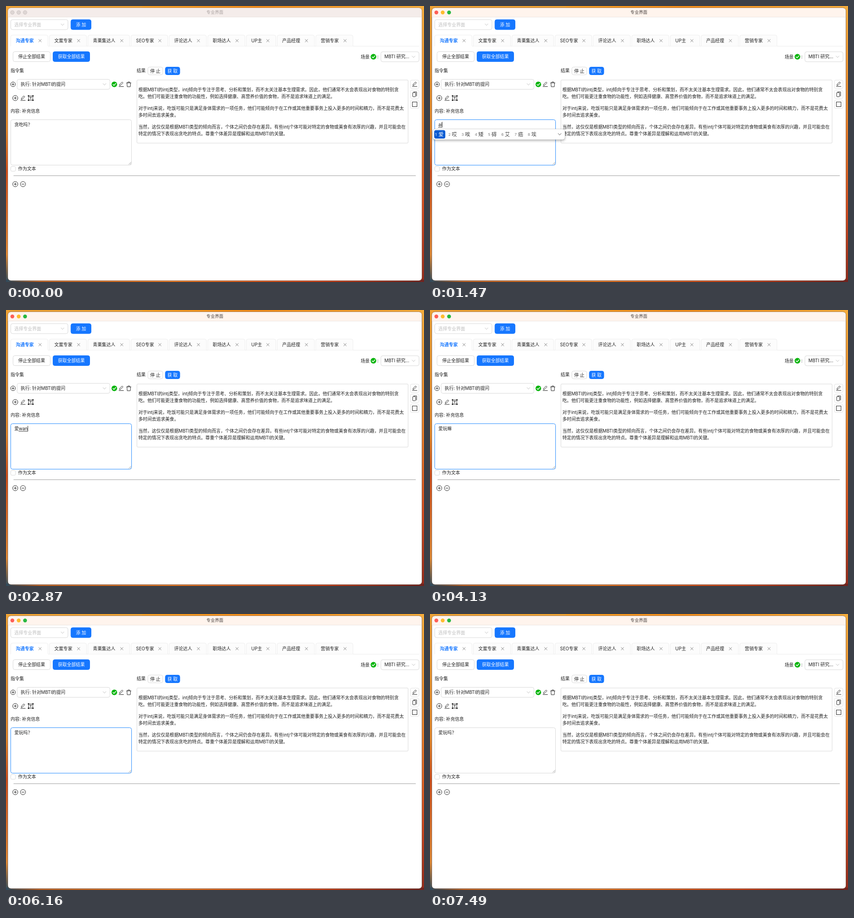
An HTML page for the animation above (8000 ms loop, 921x608 px).

```html
<!DOCTYPE html>
<html lang="zh-CN">
<head>
<meta charset="utf-8">
<title>专业界面</title>
<style>
html, body { margin: 0; width: 100%; height: 100%; overflow: hidden; }
body { background: #d9772a; }
svg { display: block; width: 921px; height: 608px; }
text { font: 9.85px Inter, 'Noto Sans CJK SC', sans-serif; fill: #1f1f1f; white-space: pre; }
.line { fill: none; stroke: #222; stroke-width: 1; stroke-linecap: round; stroke-linejoin: round; }
</style>
</head>
<body>
<svg id="stage" viewBox="0 0 921 608" lang="zh-CN">
  <defs>
    <linearGradient id="top">
      <stop offset="0" stop-color="#eda235"/><stop offset=".3" stop-color="#f3a12a"/>
      <stop offset=".6" stop-color="#f08c1c"/><stop offset="1" stop-color="#f4ac3c"/>
    </linearGradient>
    <linearGradient id="left" x2="0" y2="1">
      <stop offset="0" stop-color="#eda235"/><stop offset=".45" stop-color="#e58a2c"/>
      <stop offset=".6" stop-color="#cf4f1c"/><stop offset=".9" stop-color="#e08a36"/>
      <stop offset="1" stop-color="#2f4a5c"/>
    </linearGradient>
    <linearGradient id="right" x2="0" y2="1">
      <stop offset="0" stop-color="#f4ac3c"/><stop offset=".4" stop-color="#e8832a"/>
      <stop offset=".75" stop-color="#cf4a20"/><stop offset="1" stop-color="#8f2a1c"/>
    </linearGradient>
    <linearGradient id="bottom">
      <stop offset="0" stop-color="#2f4a5c"/><stop offset=".08" stop-color="#b8652c"/>
      <stop offset=".4" stop-color="#d9772a"/><stop offset=".75" stop-color="#c2451f"/>
      <stop offset="1" stop-color="#6e2420"/>
    </linearGradient>
    <filter id="soft" x="-10%" y="-60%" width="120%" height="260%">
      <feDropShadow dx="0" dy="2.5" stdDeviation="2.5" flood-opacity=".3"/>
    </filter>
  </defs>
  <g id="base"></g>
  <g id="live"></g>
</svg>
<script>
const BLUE = '#1677ff', GREY = '#d9d9d9', LOOP = 8000, STEP = 70;
const byId = id => document.getElementById(id);
let layer = byId('base');

function add(tag, attrs, content) {
  const el = document.createElementNS('http://www.w3.org/2000/svg', tag);
  for (const k in attrs) el.setAttribute(k, attrs[k]);
  if (content != null) el.textContent = content;
  return layer.appendChild(el);
}
const box = (x, y, w, h, fill = '#fff', stroke = 'none', rx = 0) =>
  add('rect', { x, y, width: w, height: h, fill, stroke, rx });
const disc = (cx, cy, r, fill, stroke = 'none') => add('circle', { cx, cy, r, fill, stroke });
const line = (d, style = '') => add('path', { d, class: 'line', style });
const label = (x, y, s, style = '') => add('text', { x, y, style }, s);
const middle = (x, y, s, style = '') => label(x, y, s, 'text-anchor:middle;' + style);

function button(x, y, w, h, s, primary) {
  const el = box(x, y, w, h, primary ? BLUE : '#fff', primary ? BLUE : GREY, 4);
  middle(x + w / 2, y + h / 2 + 3.6, s, primary ? 'fill:#fff;font-weight:500' : '');
  return el;
}
const chevron = (x, y, color = '#bbb') =>
  line(`M${x - 3.3} ${y - 1.7}l3.3 3.6l3.3 -3.6`, `stroke:${color};stroke-width:.9`);
function select(x, y, w, s, color = '#1f1f1f') {
  box(x, y, w, 22, '#fff', GREY, 4);
  label(x + 7.8, y + 14.6, s, `fill:${color}`);
  chevron(x + w - 12, y + 11);
}
function check(x, y) {
  disc(x, y, 6.2, '#0bb50f');
  line(`M${x - 3} ${y + .2}l2.2 2.2l4 -4.4`, 'stroke:#fff;stroke-width:1.5');
}
function circleIcon(x, y, r, plus) {
  disc(x, y, r, 'none', '#222');
  line(`M${x - 2.7} ${y}h5.4` + (plus ? `M${x} ${y - 2.7}v5.4` : ''));
}
function pen(x, y) {
  line(`M${x - 5} ${y + 5}h10`, 'stroke-width:1.1');
  line(`M${x - 3.8} ${y + 2.5}l.6 -2.6l5 -5l2 2l-5 5z`);
}

function drawWallpaper() {
  box(0, 0, 921, 608, 'url(#top)');
  box(0, 0, 300, 608, 'url(#left)');
  box(621, 4, 300, 604, 'url(#right)');
  box(0, 603, 921, 5, 'url(#bottom)');
}

function drawTabs() {
  const tabs = [[10, 82, '沟通专家'], [95, 82, '文案专家'], [180, 92, '青栗集达人'], [275, 81, 'SEO专家'],
    [359, 82, '评论达人'], [444, 82, '职场达人'], [529, 65, 'UP主'], [597, 82, '产品经理'], [682, 82, '营销专家']];
  line('M10 88.5H910', 'stroke:#ececec');
  tabs.forEach(([x, w, s], i) => {
    add('path', {
      d: `M${x + .5} 88.5V68q0 -4 4 -4h${w - 8}q4 0 4 4V88.5`,
      fill: i ? '#fcfcfc' : '#fff', stroke: '#eee'
    });
    if (!i) line(`M${x + 1} 88.5h${w - 1}`, 'stroke:#fff;stroke-width:1.4');
    label(x + 11.6, 80, s, i ? '' : `fill:${BLUE};font-weight:600`);
    const cx = x + w - 17;
    line(`M${cx - 2.9} 73.5l5.8 5.8m0 -5.8l-5.8 5.8`, 'stroke:#777;stroke-width:.9');
  });
}

function drawLeft() {
  select(10.5, 30, 126, '选择专业界面', '#bfbfbf');
  button(143, 30, 44.5, 22, '添 加', true);
  button(15.5, 100.5, 82, 22, '停止全部结果');
  button(103.5, 100.5, 81, 22, '获取全部结果', true);
  label(10, 145.8, '指令集');

  circleIcon(15.5, 172.5, 5.2, true);
  select(24.5, 161.5, 204.5, '执行: 针对MBTI的提问');
  check(238.7, 172.6);
  pen(254, 172.5);
  line('M265.5 169.3h10M268.5 169v-1.7h4v1.7M266.6 169.5l.5 8.4h6.8l.5 -8.4');

  circleIcon(20.4, 202.8, 5.7, true);
  pen(37.5, 203);
  box(50, 198.3, 9, 9, 'none', '#222');
  line('M52.5 201h4M54.5 201v4', 'stroke-width:1.1');
  [[49.6, 198], [59.4, 198], [49.6, 207.6], [59.4, 207.6]].forEach(([x, y]) => box(x - 1.4, y - 1.4, 2.8, 2.8, '#222'));

  label(10, 234.8, '内容: 补充信息');
  box(10.5, 353.5, 10.5, 10.5, '#fff', GREY, 2.5);
  label(26.8, 362.2, '作为文本');
  line('M17 373.8H902.5', 'stroke:#999');
  circleIcon(20.4, 392.4, 5.7, true);
  circleIcon(37.4, 392.4, 5.7, false);
}

function drawRight() {
  label(781.5, 115.6, '场景');
  check(809.6, 111.8);
  label(818, 115.4, ':');
  select(826, 100.8, 84, 'MBTI 研究...');
  label(288, 146.3, '结果');
  button(312.5, 134.5, 33, 17, '停 止');

  box(288.5, 163, 597.5, 139, '#fff', GREY, 2);
  [[187.6, '根据MBTI的intj类型，intj倾向于专注于思考、分析和策划，而不太关注基本生理需求。因此，他们通常不太会表现出对食物的特别贪'],
   [203, '吃。他们可能更注重食物的功能性，例如选择健康、高营养价值的食物，而不是追求味道上的满足。'],
   [228.6, '对于intj来说，吃饭可能只是满足身体需求的一项任务，他们可能倾向于在工作或其他重要事务上投入更多的时间和精力，而不是花费太'],
   [244, '多时间去追求美食。'],
   [269.6, '当然，这仅仅是根据MBTI类型的倾向而言，个体之间仍会存在差异。有些intj个体可能对特定的食物或美食有浓厚的兴趣，并且可能会在'],
   [285.2, '特定的情况下表现出贪吃的特点。尊重个体差异是理解和运用MBTI的关键。']
  ].forEach(([y, s]) => label(291.7, y, s));

  [172.5, 194.5, 216.5].forEach(y => box(891.2, y - 9.2, 18.6, 18.4, '#fff', '#e2e2e2', 3));
  pen(900.5, 172.3);
  box(896, 190.8, 6.6, 9, '#fff', '#222', 1);
  line('M898 189.2h6.8v9.2');
  box(895.4, 211.4, 10.2, 10.2, '#fff', '#222');
}

drawWallpaper();
const frame = box(4, 4, 912.5, 601, '#fff', 'rgba(70,30,10,.45)', 7);
const bar = add('path', { d: 'M4.4 24V11q0 -6.6 6.6 -6.6H909.5q6.6 0 6.6 6.6V24z' });
line('M4.5 24.4H916', 'stroke:#e6deda;stroke-width:.8');
const lights = [14, 28, 42].map(x => disc(x, 14.2, 4.2, '#ddd'));
const title = middle(460.2, 17.4, '专业界面', 'font-size:9.3px;font-weight:500');
drawTabs();
drawLeft();
drawRight();
const wave = box(0, 0, 0, 0, BLUE);
const fetchButton = button(351, 134.5, 32, 17, '获 取', true);
const halo = box(9.5, 249.5, 268, 102, 'none', 'rgba(5,145,255,.12)', 5);
const area = box(10.5, 250.5, 266, 100, '#fff', GREY, 4);
line('M270.5 349l5 -5M273.5 349l2 -2', 'stroke:#888;stroke-width:.8');

// Tokens stand for the two pictograms in the candidate list.
const words = {
  a: '啊阿爱吖按安哎傲', ai: '爱哎唉矮碍艾癌埃',
  w: '我王T为喂网W万', wa: '哇挖娃瓦蛙袜洼歪玩', wan: '玩完万晚碗湾弯挽丸',
  m: '嘛吗没妈们每买么', ma: '嘛吗妈马骂麻码玛'
};
// time, committed text, composing letters, candidate key, caret
const script = [
  [0, '贪吃吗？', '', '', 0], [560, '贪吃吗？', '', '', 1], [980, '贪吃吗？', '', '', 0],
  [1400, '', 'a', 'a', 1], [1470, '', 'ai', 'ai', 1], [1890, '', 'ai', '', 1], [1960, '爱', '', '', 1],
  [2100, '爱', 'w', 'w', 1], [2450, '爱', 'wa', 'wa', 1], [2520, '爱', 'wan', 'wan', 1],
  [2870, '爱', 'wan', '', 1], [2940, '爱玩', '', '', 1],
  [3150, '爱玩', 'm', 'm', 1], [3220, '爱玩', 'ma', '', 1], [3290, '爱玩嘛', '', '', 1],
  [3570, '爱玩嘛？', '', '', 1], [4130, '爱玩嘛', '', '', 0], [4200, '爱玩', '', '', 1], [4690, '爱玩', '', '', 0],
  [4970, '爱玩', 'm', 'm', 1], [5040, '爱玩', 'ma', 'ma', 1], [5460, '爱玩', 'ma', '', 1],
  [5530, '爱玩吗', '', '', 1], [5670, '爱玩吗？', '', '', 1], [6160, '爱玩吗？', '', '', 0]
];

function tiger(x, y) {
  disc(x - 4, y - 4, 2, '#d98a25');
  disc(x + 4, y - 4, 2, '#d98a25');
  disc(x, y, 5.2, '#f0a734');
  disc(x, y + 2.6, 2.3, '#fff3dd');
  line(`M${x - 1.5} ${y - 4}h3M${x - 4.6} ${y + .8}h1.6M${x + 3} ${y + .8}h1.6M${x - 2} ${y - 1}v.4M${x + 2} ${y - 1}v.4`, 'stroke:#5a3510');
}
function web(x, y) {
  for (let i = 0; i < 4; i++) {
    const c = 6 * Math.cos(i * Math.PI / 4), s = 6 * Math.sin(i * Math.PI / 4);
    line(`M${x - c} ${y - s}L${x + c} ${y + s}`, 'stroke:#aaa;stroke-width:.6');
  }
  [2, 3.8, 5.5].forEach(r => add('circle', { cx: x, cy: y, r, class: 'line', style: 'stroke:#b5b5b5;stroke-width:.6' }));
}

function drawPanel(x, list) {
  box(x, 271, 291, 23.2, '#fff', 'rgba(0,0,0,.13)', 5).setAttribute('filter', 'url(#soft)');
  box(x + 3, 273.5, 24.5, 18.5, '#0a5bd3', 'none', 4);
  let at = x + 5;
  [...list].forEach((ch, i) => {
    label(at, 285.9, i + 1, `font-size:8px;fill:${i ? '#777' : '#fff'}`);
    if (ch === 'T') { tiger(at + 15, 282.5); at += 2; }
    else if (ch === 'W') { web(at + 15.5, 282.3); at += 3.5; }
    else label(at + 7.6, 286.6, ch, `font-size:11.3px;fill:${i ? '#444' : '#fff'}`);
    at += 29.2;
  });
  chevron(x + 279.5, 282.4, '#444');
}

function drawInput(i, selected) {
  const [, text, letters, key, caret] = script[i];
  const x = 18.4, y = 265.4;
  layer = byId('live');
  layer.replaceChildren();
  if (selected) box(x, 254.5, 40, 15.5, '#b3d7ff');
  const run = label(x, y, text + letters);
  const end = x + (text + letters ? run.getComputedTextLength() : 0);
  const start = x + text.length * 9.85;
  if (letters) line(`M${start} 267.2H${end}`, 'stroke-width:.9');
  if (caret) box(end, 255.2, .9, 12, '#111');
  if (key) drawPanel(start - 12.2, words[key]);
}

const clamp = v => Math.max(0, Math.min(1, v));
const ease = v => 1 - (1 - clamp(v)) ** 3;
const mix = (a, b, k) => `rgb(${a.map((v, i) => Math.round(v + (b[i] - v) * k))})`;

function drawWindow(active) {
  frame.setAttribute('stroke', active ? 'rgba(60,25,5,.55)' : 'rgba(70,30,10,.4)');
  bar.setAttribute('fill', active ? '#fff4ed' : '#f4ecea');
  title.style.fill = active ? '#4a4341' : '#aaa2a0';
  ['#fe5f57', '#febc2e', '#28b840'].forEach((c, i) => {
    lights[i].setAttribute('fill', active ? c : '#ded6d4');
    lights[i].setAttribute('stroke', active ? 'none' : '#c4bcba');
    lights[i].setAttribute('stroke-width', .7);
  });
}

function drawFocus(t) {
  const k = ease((t - 490) / 280) * (1 - ease((t - 6510) / 280));
  area.setAttribute('stroke', mix([217, 217, 217], [64, 150, 255], k));
  halo.setAttribute('opacity', k);
}

function drawClick(t) {
  const hover = ease((t - 6440) / 200) * (1 - ease((t - 6930) / 280));
  const color = mix([22, 119, 255], [64, 150, 255], hover);
  fetchButton.setAttribute('fill', color);
  fetchButton.setAttribute('stroke', color);
  const p = t - 6580, grow = 4.2 * ease(p / 400);
  const rect = { x: 350.5 - grow, y: 134 - grow, width: 33 + 2 * grow, height: 18 + 2 * grow, rx: 4 + grow };
  for (const key in rect) wave.setAttribute(key, rect[key]);
  wave.setAttribute('opacity', p < 0 ? 0 : .2 * (1 - ease(p / 900)));
}

let last = -1;
function tick() {
  const t = Math.floor(performance.now() % LOOP / STEP) * STEP;
  if (t !== last) {
    last = t;
    drawWindow(t >= 490);
    drawFocus(t);
    drawClick(t);
    drawInput(script.findLastIndex(s => s[0] <= t), t >= 980 && t < 1400);
  }
  requestAnimationFrame(tick);
}
tick();
</script>
</body>
</html>
```
